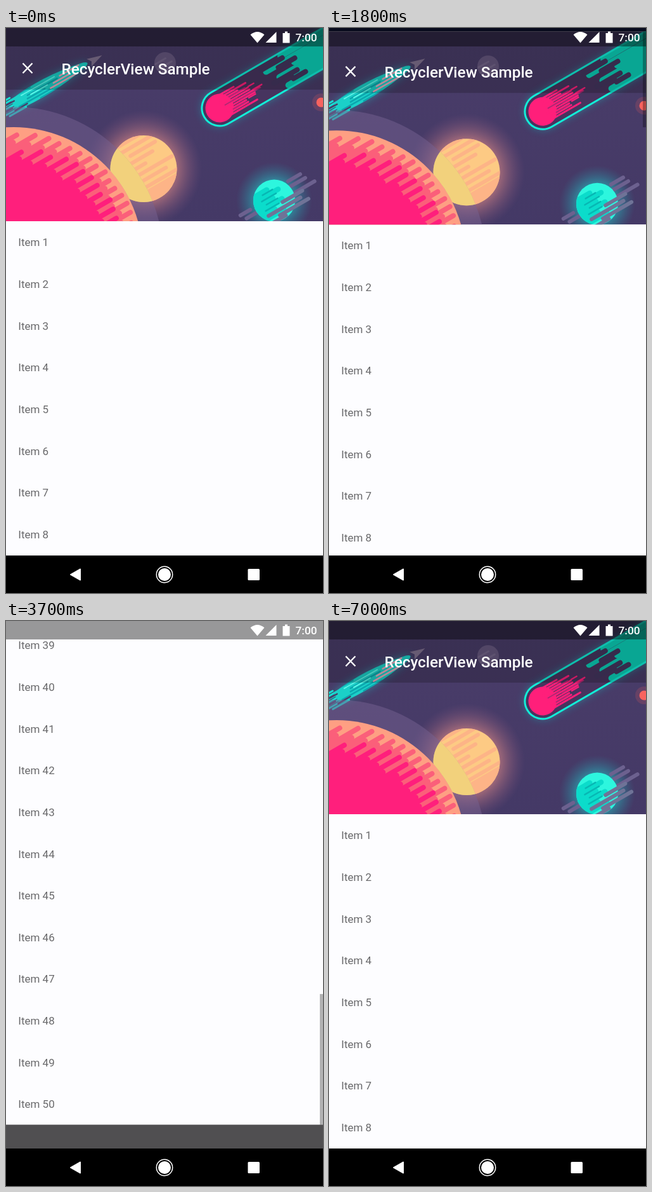
Recreate the animation shown at these times as an HTML page. Size 500 by 889 pixels, loop 7050 ms.

```html
<!DOCTYPE html>
<html lang="en">
<head>
<meta charset="utf-8">
<title>RecyclerView Sample</title>
<style>
  html, body { margin: 0; width: 100%; height: 100%; overflow: hidden; background: #000; }
  svg { display: block; width: 500px; height: 889px; }
  text { font-family: Roboto, "Noto Sans", sans-serif; white-space: pre; }
  .item { font-size: 17px; fill: #69696b; }
  .title { font-size: 24.3px; font-weight: 500; fill: #fff; }
  .clock { font-size: 17.3px; font-weight: 500; fill: #fff; }
  .bars { fill: none; stroke-linecap: round; }
</style>
</head>
<body>
<svg viewBox="0 0 500 889">
  <defs>
    <clipPath id="pageClip"><rect width="500" height="830"/></clipPath>
    <clipPath id="artClip"><rect width="500" height="304"/></clipPath>
    <clipPath id="bigClip"><circle cx="12" cy="360" r="204"/></clipPath>
    <clipPath id="ringClip"><circle cx="12" cy="360" r="236"/></clipPath>
    <clipPath id="sunClip"><circle cx="217" cy="221.500" r="52.500"/></clipPath>
    <clipPath id="seaClip"><circle cx="423" cy="271.500" r="33"/></clipPath>
    <clipPath id="moonClip"><circle cx="251" cy="55" r="17"/></clipPath>
    <clipPath id="cometClip"><rect x="-28" y="-28" width="260" height="56" rx="28"/></clipPath>
    <clipPath id="rocketClip"><path d="M2 -9Q62 -18 130 -4Q142 0 130 4Q62 17 2 10Z"/></clipPath>
    <linearGradient id="sky" x2="0" y2="1">
      <stop stop-color="#4a3d69"/><stop offset="1" stop-color="#443966"/>
    </linearGradient>
    <radialGradient id="sunGlow">
      <stop offset=".55" stop-color="#e08a86" stop-opacity=".6"/>
      <stop offset="1" stop-color="#8a5880" stop-opacity="0"/>
    </radialGradient>
    <radialGradient id="seaGlow">
      <stop offset=".5" stop-color="#21c9cb" stop-opacity=".55"/>
      <stop offset="1" stop-color="#2a8aa0" stop-opacity="0"/>
    </radialGradient>
    <filter id="blur" x="-30%" y="-60%" width="160%" height="220%"><feGaussianBlur stdDeviation="7"/></filter>
  </defs>

  <!-- dimmed screen behind the page -->
  <rect width="500" height="830" fill="#504f51"/>
  <rect width="500" height="97" fill="#131938"/>
  <rect width="500" height="29" fill="#0e1331"/>

  <g id="page" clip-path="url(#pageClip)">
    <rect width="500" height="830" fill="#fdfdff"/>
    <g id="list">
      <g id="art" clip-path="url(#artClip)"></g>
      <rect width="500" height="97" fill="#000" opacity=".2"/>
      <path d="M26.500 55.500l15 15.500m0 -15.500l-15 15.500" stroke="#fff" stroke-width="2.400"/>
      <text class="title" x="87.500" y="72.500">RecyclerView Sample</text>
      <g id="items"></g>
    </g>
    <rect id="inset" width="500" height="29" fill="#3f4bae"/>
    <rect id="thumb" x="495" width="5" opacity=".3"/>
  </g>

  <!-- status bar -->
  <rect width="500" height="29" opacity=".4"/>
  <g fill="#fff">
    <path d="M385.500 10.500Q396.500 1.500 407.500 10.500L396.500 23.500Z"/>
    <path d="M409.500 23L426.500 6V23Z"/>
    <path d="M436.500 8h3.500v-2.500h4v2.500h3.500v15.500h-11z"/>
  </g>
  <text class="clock" x="456.500" y="21.300">7:00</text>

  <!-- navigation bar -->
  <rect y="830" width="500" height="59"/>
  <g fill="#fff">
    <path d="M102 860L117 851.500V868.500Z" stroke="#fff" stroke-width="2" stroke-linejoin="round"/>
    <circle cx="250" cy="860" r="10"/>
    <circle cx="250" cy="860" r="12.700" fill="none" stroke="#fff" stroke-width="1.500"/>
    <rect x="381.500" y="851" width="18.500" height="18" rx="1.500"/>
  </g>
</svg>
<script>
const LOOP = 7050, STEP = 50;
const VIEW = 830, HEAD = 304, ROW = 65.64, COUNT = 50;
const MAX = HEAD + ROW * COUNT - VIEW;
const $ = id => document.getElementById(id);

function seeded(seed) {
  return () => (seed = (seed * 16807) % 2147483647) / 2147483647;
}

// Smooth curve through [time, value] keys that never overshoots them.
function track(keys) {
  const slope = keys.slice(1).map(([t, v], i) => (v - keys[i][1]) / (t - keys[i][0]));
  const tangent = keys.map((_, i) => {
    const a = slope[i - 1] || 0, b = slope[i] || 0;
    return a * b > 0 ? 2 * a * b / (a + b) : 0;
  });
  return t => {
    let i = 0;
    while (i < keys.length - 2 && t >= keys[i + 1][0]) i++;
    const [t0, v0] = keys[i], [t1, v1] = keys[i + 1];
    const h = t1 - t0, u = Math.min(1, Math.max(0, (t - t0) / h)), w = 1 - u;
    return v0 * (1 + 2 * u) * w * w + tangent[i] * h * u * w * w
         + v1 * u * u * (3 - 2 * u) - tangent[i + 1] * h * u * u * w;
  };
}

// Rounded strokes; each is [x, y, length] along the x axis of a turned frame.
function bars(list, color, width) {
  const d = list.map(([x, y, len]) => `M${x.toFixed(1)} ${y.toFixed(1)}h${len.toFixed(1)}`).join('');
  return `<path class="bars" d="${d}" stroke="${color}" stroke-width="${width}"/>`;
}

const turned = (x, y, body, angle = -30) =>
  `<g transform="translate(${x} ${y}) rotate(${angle})">${body}</g>`;
const clipped = (id, body) => `<g clip-path="url(#${id})">${body}</g>`;
const circle = (x, y, r, fill, more = '') =>
  `<circle cx="${x}" cy="${y}" r="${r}" fill="${fill}" ${more}/>`;

// Ragged disc: strokes that end around a radius, alternately long and short.
function ragged(radius, jag, gap, color, seed) {
  const rnd = seeded(seed), list = [];
  for (let y = -radius, k = 0; y < radius; y += gap, k++) {
    const half = Math.sqrt(Math.max(0, radius * radius - y * y));
    const end = half + (k % 2 ? 1 : -1) * jag * (0.4 + 0.6 * rnd());
    list.push([-half - 20, y, half + 20 + end]);
  }
  return bars(list, color, gap + 0.4);
}

function fan(count, gap, color, width, seed, from, len, jitter) {
  const rnd = seeded(seed), list = [];
  for (let i = 0; i < count; i++) {
    list.push([from + rnd() * jitter, (i - (count - 1) / 2) * gap, len * (0.5 + rnd() * 0.5)]);
  }
  return bars(list, color, width);
}

function bigPlanet() {
  return circle(12, 360, 236, '#776391', 'opacity=".5"')
    + circle(12, 360, 204, '#fe9f83')
    + clipped('bigClip', turned(12, 360,
        ragged(186, 13, 7.5, '#fb5f7a', 41) + ragged(159, 19, 7.5, '#ff1f7c', 77)));
}

function sun() {
  const stripes = turned(217, 221,
    fan(10, 11, '#fdb487', 6, 15, -34, 70, 26) + bars([[-30, 44, 70], [-20, 36, 60]], '#fdb487', 8));
  return circle(217, 221.5, 92, 'url(#sunGlow)')
    + circle(217, 221.5, 52.5, '#fdca84')
    + clipped('sunClip', stripes + clipped('ringClip',
        '<rect x="150" y="160" width="130" height="120" fill="#fddb7b"/>'
        + turned(217, 221, bars([[-28, 5, 34], [-35, 18, 38], [-30, 31, 32]], '#fdd07d', 6))));
}

function seaPlanet() {
  const back = bars([[10, -6, 50], [24, 6, 46], [-52, 3, 30], [-58, -6, 18], [34, -15, 22]], '#6c618f', 6);
  const shade = bars([[-40, -20, 38], [-40, -12, 54], [-40, -4, 40], [-40, 4, 52], [-40, 12, 34], [-40, 20, 46]], '#0bdccb', 8.3);
  const front = bars([[-20, 17, 58], [-4, 25, 52], [10, 9, 36], [-30, 30, 34]], '#6f7397', 6);
  return circle(423, 271, 60, 'url(#seaGlow)')
    + turned(423, 271, back)
    + circle(423, 271.5, 33, '#2df6de')
    + clipped('seaClip', turned(423, 271, shade
        + bars([[-12, -16, 18], [-18, -8, 26], [-14, 0, 20], [-20, 8, 24]], '#07b8b4', 2.5)))
    + turned(423, 271, front);
}

function comet() {
  const body = '<rect x="-28" y="-28" width="260" height="56" rx="28"';
  const tail = bars([[124, -23, 120], [92, -13, 150], [138, -4, 120], [106, 5, 150], [132, 14, 130], [112, 23, 150]], '#0bcfb7', 9.6);
  const holes = bars([[86, -19, 39], [112, -9, 30], [94, 9, 42], [124, 18, 22]], '#43365f', 8);
  const head = circle(0, 0, 22.5, '#ff1f7a')
    + fan(10, 4, '#ff1f7a', 3, 23, 4, 62, 8)
    + bars([[22, -8, 28], [10, 0, 22], [34, 4, 38], [18, 12, 22]], '#b02873', 2)
    + bars([[56, -7, 10], [60, 1, 16], [48, 9, 12]], '#ff1f7a', 2.4);
  return turned(337, 126,
    `${body} fill="#18cfcf" opacity=".45" filter="url(#blur)"/>`
    + `${body} fill="#47345f"/>`
    + clipped('cometClip', tail + holes) + head
    + `${body} fill="none" stroke="#12efd8" stroke-width="3"/>`);
}

function rocket() {
  const body = '<path d="M2 -9Q62 -18 130 -4Q142 0 130 4Q62 17 2 10Z"';
  return turned(10, 122,
    `${body} fill="#15d8d8" opacity=".4" filter="url(#blur)"/>`
    + '<path d="M138 -6L162 1L139 8L143 1Z" fill="#81728f"/>'
    + fan(7, 4.2, '#15dfd2', 3, 8, -22, 46, 16)
    + `${body} fill="#1bd0c8"/>`
    + clipped('rocketClip', fan(6, 4.6, '#0ca6ae', 2.6, 31, 6, 60, 44)
        + bars([[66, 6, 48], [74, 1, 28], [88, -4, 34]], '#e9a9bd', 2.6)
        + bars([[20, -7, 60], [34, -1, 30]], '#5af6e8', 2))
    + bars([[-8, -5, 14], [-14, 4, 12], [0, 9, 22]], '#4a3d69', 2.4), -29.5);
}

$('art').innerHTML = '<rect width="500" height="304" fill="url(#sky)"/>'
  + circle(251, 55, 17, '#66587f')
  + clipped('moonClip', turned(251, 55, bars([[-18, -6, 22], [-18, 3, 28], [-18, 11, 20]], '#75668b', 3)))
  + rocket() + comet()
  + circle(497, 117, 14, '#f4605f', 'opacity=".18"') + circle(497, 117, 7.5, '#f7635f')
  + sun() + bigPlanet()
  + clipped('sunClip', clipped('ringClip',
      '<path fill-rule="evenodd" fill="#fddb7b" opacity=".85" d="M150 160h130v120h-130zM-192 360a204 204 0 1 0 408 0a204 204 0 1 0 -408 0z"/>'))
  + seaPlanet();

$('items').innerHTML = Array.from({ length: COUNT }, (_, i) =>
  `<text class="item" x="19.300" y="${(343.3 + i * ROW).toFixed(2)}">Item ${i + 1}</text>`).join('');

// Elastic pull of the whole page, and scroll of the list inside it.
const pull = track([[0, 0], [650, 46], [1100, 60], [1800, 5.2], [2000, 1.5], [3000, 1.5],
  [3300, 0], [3450, 0], [3700, -37.3], [4300, -62], [4900, -39.7], [5300, 0], [LOOP, 0]]);
const scroll = track([[0, 0], [1800, 0], [2250, 380], [2600, 968.5], [3000, 1760],
  [3450, MAX], [5850, MAX], [6250, 1100], [6650, 0], [LOOP, 0]]);
const fade = track([[0, 0], [150, 1], [6750, 1], [6980, 0], [LOOP, 0]]);

const rowTop = i => i ? HEAD + (i - 1) * ROW : 0;
const rowAt = y => y < HEAD ? 0 : 1 + Math.floor((y - HEAD) / ROW);

// Thumb size follows the mean height of the rows on screen.
function thumb(s) {
  const first = rowAt(s), last = Math.min(COUNT, rowAt(s + VIEW - 0.1));
  const mean = (rowTop(last + 1) - rowTop(first)) / (last - first + 1);
  const scale = VIEW / (mean * (COUNT + 1));
  return { y: (first * mean + s - rowTop(first)) * scale, height: VIEW * scale };
}

function draw(now) {
  const t = Math.floor((now % LOOP) / STEP) * STEP;
  const s = scroll(t), bar = thumb(s);
  $('page').setAttribute('transform', `translate(0 ${pull(t).toFixed(2)})`);
  $('list').setAttribute('transform', `translate(0 ${(-s).toFixed(2)})`);
  $('inset').setAttribute('opacity', Math.min(1, Math.max(0, (s - 160) / 115)));
  $('thumb').setAttribute('y', bar.y);
  $('thumb').setAttribute('height', bar.height);
  $('thumb').setAttribute('opacity', 0.3 * fade(t));
}

const start = performance.now();
function tick() {
  draw(performance.now() - start);
  requestAnimationFrame(tick);
}
tick();
</script>
</body>
</html>
```
